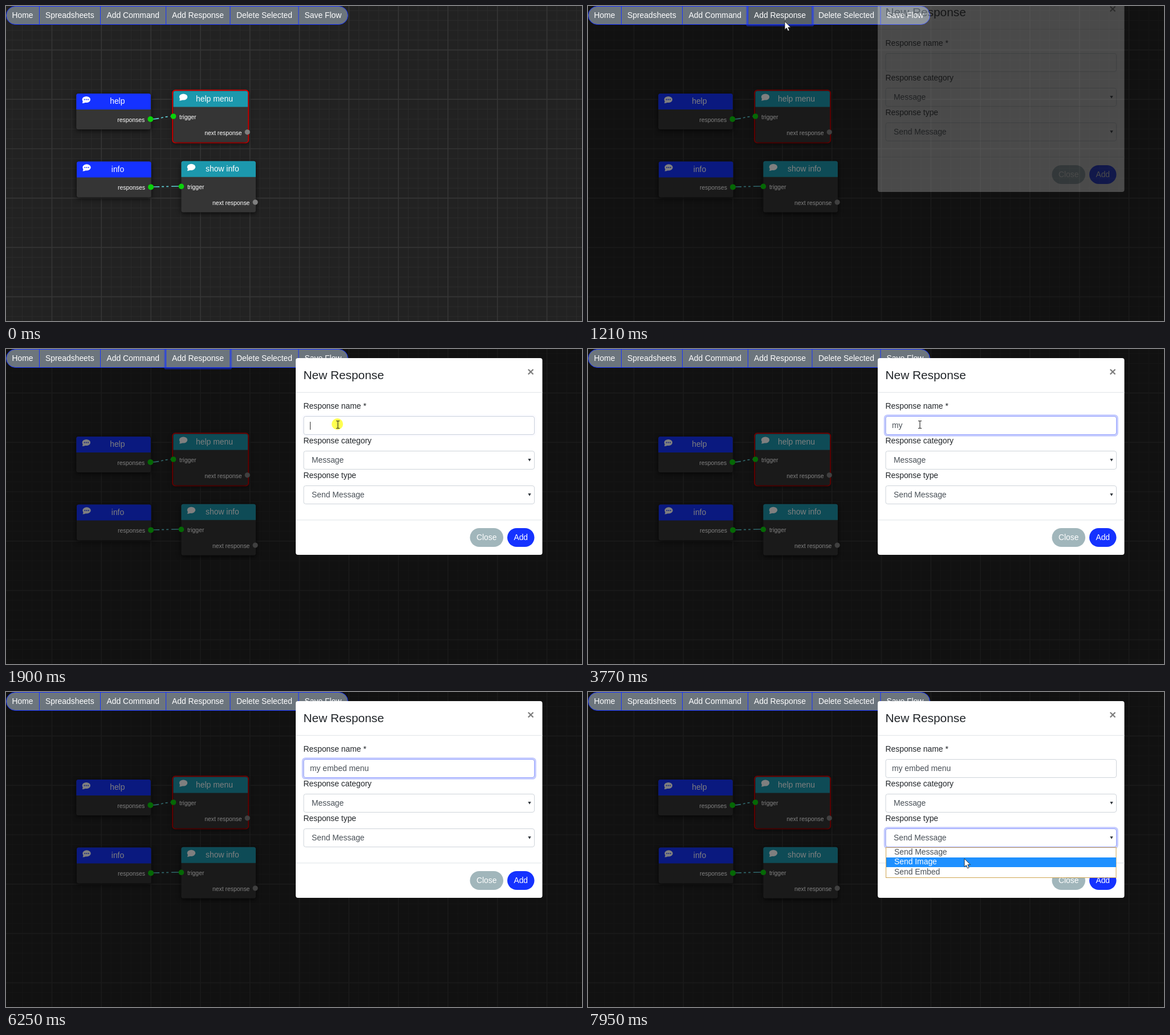
An HTML page for the animation above (8 s loop, 1010 by 554 pixels).

```html
<!DOCTYPE html>
<html lang="en">
<head>
<meta charset="utf-8">
<title>New Response</title>
<style>
  html, body { margin: 0; width: 100%; height: 100%; overflow: hidden; background: #222; }
  svg { display: block; width: 1010px; height: 554px; }
  text { font: 13.89px "Liberation Sans", Arial, sans-serif; white-space: pre; }
  .small { font-size: 10.42px; }
  .title { font-size: 20.83px; }
  .close { font-size: 20.83px; font-weight: bold; }
  .node { filter: drop-shadow(0 2px 4px rgba(0, 0, 0, .8)); }
</style>
</head>
<body>
<svg id="stage" viewBox="0 0 1010 554"></svg>
<script>
const BLUE = '#1532ff', TEAL = '#1c98ad', GREEN = '#0bd20b', INK = '#212529', GREY = '#495057';
const LOOP = 8000;

const rect = (x, y, w, h, fill, rest = '') =>
  `<rect x="${x}" y="${y}" width="${w}" height="${h}" fill="${fill}" ${rest}/>`;
const text = (x, y, s, fill = '#fff', rest = '') =>
  `<text x="${x}" y="${y}" fill="${fill}" ${rest}>${s}</text>`;
const dot = (x, y, r, fill) => `<circle cx="${x}" cy="${y}" r="${r}" fill="${fill}"/>`;
const path = (d, rest) => `<path d="${d}" ${rest}/>`;
const MID = 'text-anchor="middle"', END = 'text-anchor="end"';

function grid() {
  let minor = '', major = '';
  for (let k = -4; k < 54; k++) {
    const x = (80.5 + 17.36 * k).toFixed(1), y = (77.4 + 17.36 * k).toFixed(1);
    const d = `M${x} 0V554M0 ${y}H1010`;
    if (k % 5) minor += d; else major += d;
  }
  return path(minor, 'stroke="#2d2d2d" stroke-width=".9"') +
         path(major, 'stroke="#353535" stroke-width="1.7"');
}

function node(x, y, name, isCommand) {
  const h = isCommand ? 63 : 90, icon = [0, -3.2, 3.2];
  const bubble = `<g transform="translate(${x + 17.5} ${y + 10.5})">
    <ellipse rx="7.2" ry="5.6" fill="#fff"/>${path('M-6 2Q-6 5-7.2 6.6Q-4 6.6-1 5z', 'fill="#fff"')}
    ${isCommand ? icon.map(dx => dot(dx, 0, 1, BLUE)).join('') : ''}</g>`;
  const ports = isCommand
    ? text(x + 120, y + 49.8, 'responses', '#fff', `class="small" ${END}`) + dot(x + 130, y + 45, 5, GREEN)
    : text(x + 10.5, y + 49.2, 'trigger', '#fff', 'class="small"') + dot(x, y + 44.5, 4.8, GREEN) +
      text(x + 120, y + 77.3, 'next response', '#fff', `class="small" ${END}`) +
      dot(x + 129.7, y + 72.3, 4.6, '#808080');
  return `<g class="node">${rect(x, y, 130.5, h, '#3a3a3a', 'rx="3.5" fill-opacity=".9"')}</g>` +
    path(`M${x} ${y + 28}V${y + 3.5}q0-3.5 3.5-3.5h123.5q3.5 0 3.5 3.5V${y + 28}z`,
      `fill="${isCommand ? BLUE : TEAL}"`) +
    bubble + text(x + 72, y + 18.3, name, '#fff', MID) + ports;
}

const wire = (x1, y1, x2, y2) => path(
  `M${x1} ${y1}C${x1 + 18} ${y1} ${x2 - 18} ${y2} ${x2} ${y2}`,
  'fill="none" stroke="#5fced6" stroke-width="1.7" stroke-dasharray="15 4 4 4 4 5 20"');

function nav() {
  const items = [['Home', 10.5], ['Spreadsheets', 69], ['Add Command', 176.5],
    ['Add Response', 291], ['Delete Selected', 404], ['Save Flow', 523.5]];
  return rect(.5, .5, 599, 32, '#6c757d', `rx="16" stroke="${BLUE}"`) +
    rect(280, 1, 113, 31, '#5a6268', 'id="hover"') +
    path('M58.5 0v33M165.5 0v33M280.5 0v33M393 0v33M513 0v33', `stroke="${BLUE}"`) +
    rect(278.6, -1.4, 116.2, 35.8, 'none', `id="ring" rx="2" stroke="${BLUE}" stroke-opacity=".5" stroke-width="2.8"`) +
    items.map(([s, x]) => text(x, 21, s)).join('');
}

const field = (y, id) =>
  rect(522, y + .5, 404.5, 32, '#fff', 'rx="3.5" stroke="#ced4da"') +
  `<g id="${id}">${rect(520.1, y - 1.4, 408.3, 35.8, 'none', `rx="5" stroke="${BLUE}" stroke-opacity=".25" stroke-width="2.8"`)}
   ${rect(522, y + .5, 404.5, 32, 'none', 'rx="3.5" stroke="#95a2ff"')}</g>`;
const select = (y, s, id) => field(y, id) + text(536, y + 21, s, GREY) +
  path(`M915.3 ${y + 14}h5.4l-2.7 4.8z`, 'fill="#343a40"');
const pill = (x, w, s, fill) => rect(x, 315, w, 33, fill, 'rx="16.5"') + text(x + w / 2, 336, s, '#fff', MID);

const modal = () => rect(508, 16, 432.5, 346, '#fff', 'rx="4"') +
  text(521.5, 52.7, 'New Response', INK, 'class="title"') +
  text(920, 47, '×', '#000', `class="close" opacity=".5" ${MID}`) +
  path('M508 76.3H940.5M508 300.8H940.5', 'stroke="#dfe3e7"') +
  text(521.5, 105, 'Response name *', INK) + field(118, 'inputGlow') +
  text(532.9, 139, '', GREY, 'id="value"') + rect(533, 128, 1, 14, '#333', 'id="caret"') +
  text(521.5, 166, 'Response category', INK) + select(179, 'Message', 'categoryGlow') +
  text(521.5, 227, 'Response type', INK) + select(240, 'Send Message', 'typeGlow') +
  pill(813.5, 58.5, 'Close', '#a1b6bb') + pill(879, 47.5, 'Add', BLUE);

const options = ['Send Message', 'Send Image', 'Send Embed'];
const list = () => rect(522.5, 273.5, 403.5, 53, '#fff', 'stroke="#cfa552"') +
  rect(523, 291, 403, 17, '#1e90ff', 'id="mark"') +
  options.map((s, i) => text(537, 286 + 17.3 * i, s, GREY, 'class="option"')).join('');

stage.innerHTML = rect(0, 0, 1010, 554, '#222') + grid() +
  wire(253, 199, 293, 194) + wire(254, 318, 307, 317) +
  node(123.3, 154, 'help', true) +
  rect(292.2, 148.4, 132.8, 92, 'none', 'rx="5" stroke="#f00" stroke-width="2.3"') +
  node(293.5, 149.5, 'help menu') +
  node(124, 273.4, 'info', true) + node(307.4, 272.8, 'show info') +
  rect(0, 0, 1010, 554, '#000', 'id="shade"') + nav() +
  `<g id="modal">${modal()}</g><g id="list">${list()}</g><g id="pointer">
   <circle id="press" cx="-1" cy="-1" r="10" fill="#ff3" fill-opacity=".85"/>
   ${path('M0 0V14.6l3.3-3 2.3 5.4 2.5-1.1-2.3-5.2h4.6z', 'id="arrow" fill="#fff" stroke="#222" stroke-width=".9"')}
   ${path('M-3-6.5h2.2l.8.8.8-.8H3M0-6V6M-3 6.5h2.2l.8-.8.8.8H3', 'id="beam" fill="none" stroke="#222" stroke-width="1.1"')}</g>`;

const $ = id => document.getElementById(id);
const show = (id, on) => $(id).setAttribute('opacity', +on);
const ramp = (t, start, ms) => Math.min(1, Math.max(0, (t - start) / ms));
const within = (t, a, b) => t >= a && t < b;

const bursts = [0, 70, 900, 1750, 6950], STEP = 75;
function hold(t) {
  const start = bursts.filter(b => b <= t).pop();
  return start + Math.floor((t - start) / STEP) * STEP;
}

const typed = 'my embed menu';
const keys = [2900, 3070, 3220, 4320, 4390, 4620, 4700, 4930, 5250, 5400, 5480, 5630, 5710];

// time, x, y
const track = [
  [70, 875, 527], [370, 640, 310], [670, 375, 60], [820, 345, 27], [1210, 345, 27],
  [1350, 432, 86], [1500, 510, 115], [1800, 582, 133], [6160, 582, 133],
  [6165, 753, 69], [6900, 753, 69],
  [6950, 991, 190], [7250, 790, 248], [7400, 715, 264], [7700, 715, 264], [7925, 660, 293]
];
function locate(t) {
  const i = Math.max(1, track.findIndex(p => p[0] > t));
  const [a, b] = t >= 7925 ? track.slice(-2) : [track[i - 1], track[i]];
  const u = ramp(t, a[0], b[0] - a[0]);
  return [a[1] + (b[1] - a[1]) * u, a[2] + (b[2] - a[2]) * u];
}

function drawPointer(t, h) {
  const [x, y] = locate(t > 2100 && t < 6950 ? t : h);
  const inInput = within(x, 522, 927) && within(y, 118, 151) && t > 1300 && t < 6900;
  show('pointer', t >= 70 && !within(t, 6245, 6950));
  $('pointer').setAttribute('transform', `translate(${x.toFixed(1)} ${y.toFixed(1)})`);
  show('arrow', !inInput);
  show('beam', inInput);
  show('press', within(h, 900, 1050) || within(h, 1900, 2050) || within(h, 7400, 7550));
  show('hover', within(x, 280, 393) && y < 33);
  return y;
}

function drawInput(t) {
  const count = keys.filter(k => k <= t).length;
  $('value').textContent = typed.slice(0, count);
  const width = count ? $('value').getComputedTextLength() : 0;
  $('caret').setAttribute('x', Math.round(532.9 + width));
  const last = count ? keys[count - 1] : 1900;
  show('caret', within(t, 1900, 7475) && Math.floor((t - last) / 540) % 2 === 0);
}

function draw(now) {
  const t = now % LOOP, h = hold(t);
  const y = drawPointer(t, h);
  drawInput(t);

  const entered = ramp(h, 1890, 150), left = ramp(h, 7465, 150);
  show('shade', .5 * ramp(h, 1014, 150));
  show('ring', t < 900 ? 0 : 1 - entered);
  show('inputGlow', entered - left);
  show('categoryGlow', 0);
  show('typeGlow', left);

  const slide = 43.4 * (1 - ramp(h, 1164, 300)) ** 1.65;
  show('modal', ramp(h, 1164, 150));
  $('modal').setAttribute('transform', `translate(0 ${-slide.toFixed(1)})`);

  const picked = y > 291 ? 1 : 0;
  show('list', h >= 7550);
  $('mark').setAttribute('y', 274 + 17 * picked);
  document.querySelectorAll('.option').forEach((o, i) =>
    o.setAttribute('fill', i === picked ? '#fff' : GREY));
  requestAnimationFrame(draw);
}
requestAnimationFrame(draw);
</script>
</body>
</html>
```
